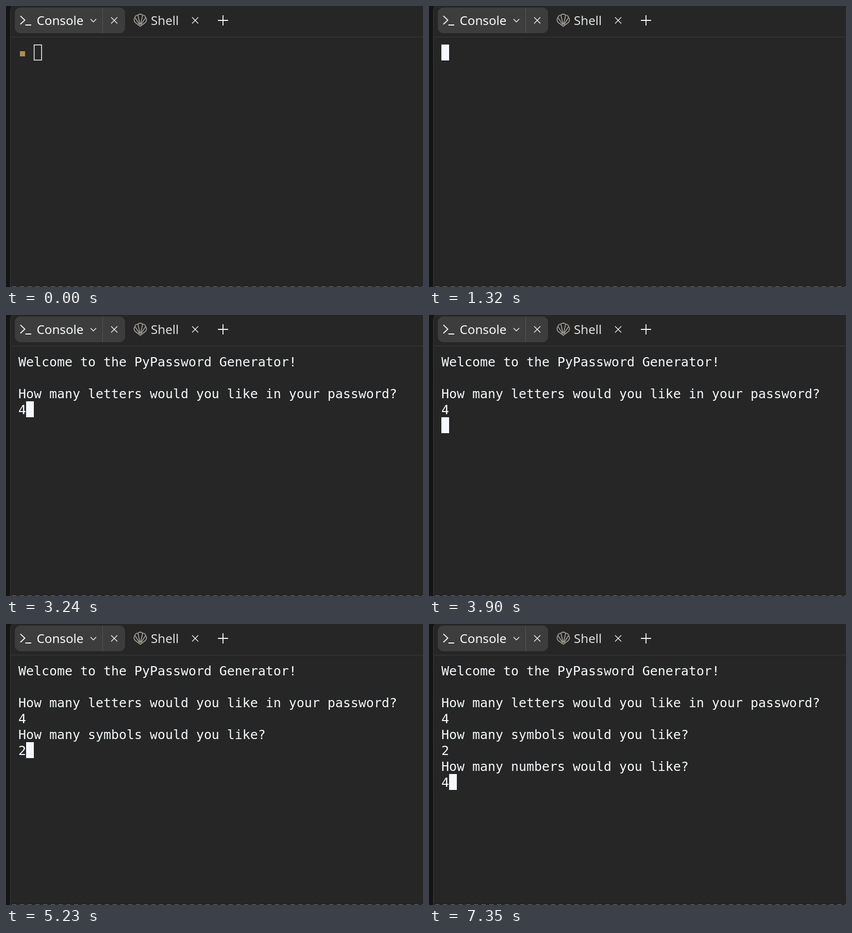
These frames come from a looping animation (809 px wide and 547 px high, 8 s). An HTML page:

```html
<!DOCTYPE html>
<html lang="en">
<head>
<meta charset="utf-8">
<title>Console</title>
<style>
  html, body { margin: 0; width: 100%; height: 100%; overflow: hidden; background: #262626; }
  svg { display: block; width: 809px; height: 547px; }
  .line { fill: none; stroke: #f5f9fc; stroke-width: 1.6; stroke-linecap: square; }
  .tab { font: 24.2px "Noto Sans", "Open Sans", sans-serif; fill: #f8fafc; }
  .idle { fill: #dcdedf; }
  .term { font: 24.91px "DejaVu Sans Mono", monospace; fill: #f5f9fc; white-space: pre; }

  .anim, .term text { animation: 8s step-end infinite; }
  .prompt { animation-name: prompt; }
  .fill { animation-name: fill; }
  .cursor { animation-name: cursor; }
  .term .intro { animation-name: intro; }
  .term .a1 { animation-name: a1; }
  .term .q2 { animation-name: q2; }
  .term .a2 { animation-name: a2; }
  .term .q3 { animation-name: q3; }
  .term .a3 { animation-name: a3; }

  @keyframes prompt { 0% { opacity: 1 } 16.5%, 100% { opacity: 0 } }
  @keyframes fill {
    0% { opacity: 0 }
    5% { opacity: .33 }
    6.25% { opacity: .67 }
    7.5%, 100% { opacity: 1 }
  }
  @keyframes intro { 0% { opacity: 0 } 17.375%, 100% { opacity: 1 } }
  @keyframes a1 { 0% { opacity: 0 } 40.5%, 100% { opacity: 1 } }
  @keyframes q2 { 0% { opacity: 0 } 49.625%, 100% { opacity: 1 } }
  @keyframes a2 { 0% { opacity: 0 } 65.375%, 100% { opacity: 1 } }
  @keyframes q3 { 0% { opacity: 0 } 74.5%, 100% { opacity: 1 } }
  @keyframes a3 { 0% { opacity: 0 } 91.875%, 100% { opacity: 1 } }

  /* 15 x 31 px character cells */
  @keyframes cursor {
    0% { opacity: 0; transform: translate(0, 0) }
    16.5% { opacity: 1; transform: translate(0, 0) }
    17.375% { opacity: 1; transform: translate(0, 93px) }
    40.5% { opacity: 1; transform: translate(15px, 93px) }
    48.75% { opacity: 1; transform: translate(0, 124px) }
    49.625% { opacity: 1; transform: translate(0, 155px) }
    65.375% { opacity: 1; transform: translate(15px, 155px) }
    73.625% { opacity: 1; transform: translate(0, 186px) }
    74.5% { opacity: 1; transform: translate(0, 217px) }
    91.875%, 100% { opacity: 1; transform: translate(15px, 217px) }
  }
</style>
</head>
<body>
<svg viewBox="0 0 809 547">
  <!-- panel -->
  <rect width="809" height="547" fill="#262626"/>
  <path d="M0 0H12Q8.5 3 8.5 10V547H0Z" fill="#141414"/>
  <path d="M12.5 0Q8.5 3 8.5 10V547" fill="none" stroke="#3a3a3a"/>
  <path d="M10 60.5H809" stroke="#3b3b3b"/>
  <path d="M12 546.5H809" stroke="#777" stroke-dasharray="8 7"/>

  <!-- tabs -->
  <rect x="17" y="3" width="214" height="50" rx="11" fill="#3d3d3d"/>
  <path d="M187.5 3V53" stroke="#565656"/>
  <path class="line" style="stroke-width:1.8" d="M28.5 20L36.5 27.5L28.5 35M38.5 37H48"/>
  <text class="tab" x="59.5" y="37">Console</text>
  <path class="line" style="stroke-width:1.4" d="M164.5 26L169.5 31L174.5 26"/>
  <path class="line" style="stroke-width:1.4" d="M204.5 22.5L215.5 33.5M215.5 22.5L204.5 33.5"/>
  <g fill="none" stroke="#a19d95" stroke-width="1.7" stroke-linejoin="round" stroke-linecap="round">
    <path d="M260.5 39.5L250.5 32Q246.5 27 250 22.5Q251 18 255.5 18Q260.5 13.5 265.5 18Q270 18 271 22.5Q274.5 27 270.5 32Z"/>
    <path d="M259 36L250.5 23M259.8 35L256 18.5M261.2 35L265 18.5M262 36L270.5 23"/>
  </g>
  <text class="tab idle" x="281" y="37">Shell</text>
  <path class="line" style="stroke-width:1.4" d="M361.5 22.5L372.5 33.5M372.5 22.5L361.5 33.5"/>
  <path class="line" style="stroke-width:1.8" d="M412 28H430M421 19V37"/>

  <!-- waiting prompt -->
  <g class="anim prompt">
    <rect x="27" y="88" width="10" height="10" fill="#b08d50"/>
    <rect class="anim fill" x="55" y="76" width="13" height="29" fill="#f5f9ff"/>
    <rect x="54.6" y="75.7" width="14.4" height="29.6" fill="none" stroke="#f5f9ff" stroke-width="1.5"/>
  </g>

  <!-- program output -->
  <g class="term">
    <text class="intro" x="24" y="100">Welcome to the PyPassword Generator!</text>
    <text class="intro" x="24" y="162">How many letters would you like in your password?</text>
    <text class="a1" x="24" y="193">4</text>
    <text class="q2" x="24" y="224">How many symbols would you like?</text>
    <text class="a2" x="24" y="255">2</text>
    <text class="q3" x="24" y="286">How many numbers would you like?</text>
    <text class="a3" x="24" y="317">4</text>
  </g>
  <rect class="anim cursor" x="24" y="75" width="15" height="31" fill="#f5f9ff"/>
</svg>
</body>
</html>
```
